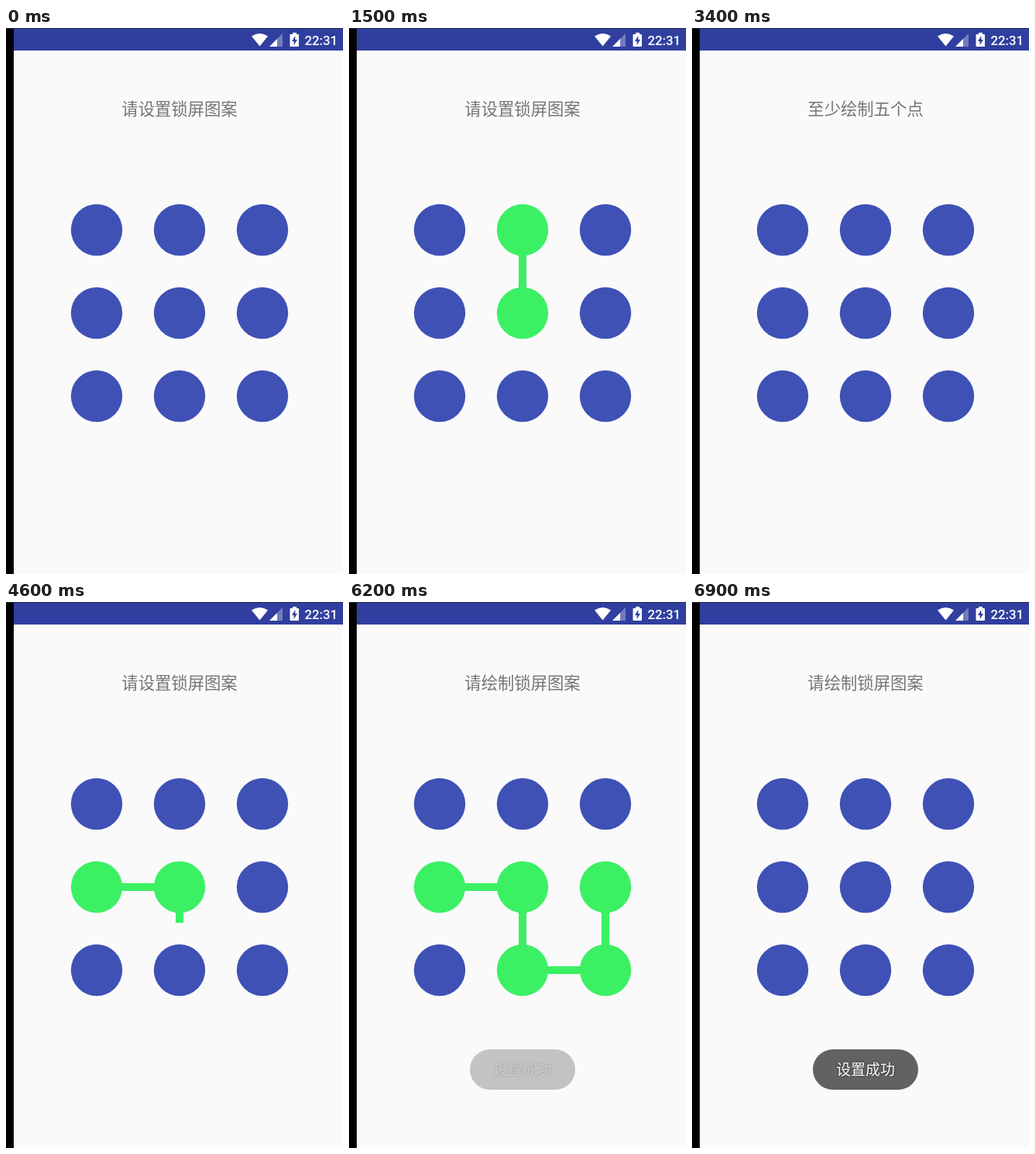
Recreate the animation shown at these times as an HTML page with a canvas. Size 435x703 px, loop 8000 ms.

```html
<!DOCTYPE html>
<html lang="zh-CN">
<head>
<meta charset="utf-8">
<title>锁屏图案</title>
<style>
  html, body { margin: 0; width: 100%; height: 100%; overflow: hidden; background: #fafafa; }
  canvas { display: block; width: 435px; height: 703px; }
</style>
</head>
<body>
<canvas id="stage" width="435" height="703"></canvas>
<script>
const ctx = document.getElementById('stage').getContext('2d');
const LOOP = 8000, STEP = 100;
const BLUE = '#3f51b5', GREEN = '#3cf064', PINK = '#ff4081', BAR = '#303f9f';
const CJK = '"Noto Sans CJK SC", "Noto Sans CJK", sans-serif';
const SET = '请设置锁屏图案', FEW = '至少绘制五个点', DRAW = '请绘制锁屏图案';

// Dots are numbered 0-8 in rows; tip is the loose end under the finger.
const states = [
  { t: 0, title: SET, path: [] },
  { t: 1100, title: SET, path: [1] },
  { t: 1400, title: SET, path: [1], tip: [224, 314] },
  { t: 1500, title: SET, path: [1, 4] },
  { t: 1800, title: SET, path: [1, 4], tip: [222, 408] },
  { t: 1900, title: SET, path: [1, 4], tip: [219, 418] },
  { t: 2100, title: SET, path: [1, 4], tip: [221, 432] },
  { t: 2200, title: SET, path: [1, 4, 7] },
  { t: 2500, title: FEW, path: [1, 4, 7], color: PINK },
  { t: 3400, title: FEW, path: [] },
  { t: 4200, title: SET, path: [3] },
  { t: 4300, title: SET, path: [3, 4] },
  { t: 4600, title: SET, path: [3, 4], tip: [224, 413] },
  { t: 4700, title: SET, path: [3, 4, 7] },
  { t: 5000, title: SET, path: [3, 4, 7], tip: [284, 474] },
  { t: 5100, title: SET, path: [3, 4, 7, 8] },
  { t: 5600, title: SET, path: [3, 4, 7, 8, 5] },
  { t: 6000, title: DRAW, path: [3, 4, 7, 8, 5] },
  { t: 6900, title: DRAW, path: [] }
];

const dotAt = i => [117 + 107 * (i % 3), 260 + 107 * Math.floor(i / 3)];

function rect(x, y, w, h, color) {
  ctx.fillStyle = color;
  ctx.fillRect(x, y, w, h);
}

function poly(points, color) {
  ctx.beginPath();
  points.forEach(p => ctx.lineTo(...p));
  ctx.closePath();
  ctx.fillStyle = color;
  ctx.fill();
}

function label(text, x, y, font, color, align) {
  ctx.font = font;
  ctx.fillStyle = color;
  ctx.textAlign = align;
  ctx.fillText(text, x, y);
}

function drawStatusBar() {
  rect(10, 0, 425, 29, BAR);
  rect(0, 0, 10, 703, '#000');
  rect(0, 0, 435, 1, '#272c4c');

  // Wi-Fi fan
  ctx.beginPath();
  ctx.moveTo(327.5, 23.5);
  ctx.lineTo(317, 10.5);
  ctx.quadraticCurveTo(327.5, 3.5, 338, 10.5);
  ctx.closePath();
  ctx.fillStyle = '#fff';
  ctx.fill();

  // Signal
  poly([[340, 24], [357, 24], [357, 7]], 'rgba(255,255,255,.32)');
  poly([[340, 24], [350, 24], [350, 14]], '#fff');

  // Battery with bolt
  rect(370, 6, 5, 3, '#fff');
  ctx.beginPath();
  ctx.roundRect(366.5, 8, 11.5, 16, 1);
  ctx.fillStyle = '#fff';
  ctx.fill();
  poly([[373.3, 10], [369, 17], [371.6, 17], [371.6, 22], [376, 15], [373.3, 15]], BAR);

  label('22:31', 428, 22, '500 16.8px Roboto, sans-serif', '#fff', 'right');
}

function drawPattern({ path, tip, color = GREEN }) {
  const line = path.map(dotAt);
  if (tip) line.push(tip);
  ctx.beginPath();
  line.forEach(p => ctx.lineTo(...p));
  ctx.strokeStyle = color;
  ctx.lineWidth = 10;
  ctx.stroke();

  for (let i = 0; i < 9; i++) {
    ctx.beginPath();
    ctx.arc(...dotAt(i), 33.2, 0, Math.PI * 2);
    ctx.fillStyle = path.includes(i) ? color : BLUE;
    ctx.fill();
  }
}

function drawToast(time) {
  if (time < 6200) return;
  const x = Math.min(1, (time - 6100) / 500);
  ctx.save();
  ctx.globalAlpha = 1 - (1 - x) ** 2;
  ctx.beginPath();
  ctx.roundRect(156, 576, 136, 52, 26);
  ctx.fillStyle = '#626262';
  ctx.fill();
  ctx.shadowColor = 'rgba(0,0,0,.6)';
  ctx.shadowBlur = 3;
  label('设置成功', 224, 609, `18.9px ${CJK}`, '#fff', 'center');
  ctx.restore();
}

function frame(now) {
  const time = Math.floor((now % LOOP) / STEP) * STEP;
  const state = states.findLast(s => s.t <= time);
  rect(0, 0, 435, 703, '#fafafa');
  drawStatusBar();
  label(state.title, 224, 112, `21.35px ${CJK}`, '#757575', 'center');
  drawPattern(state);
  drawToast(time);
}

let start;
function tick(now) {
  start ??= now;
  frame(Math.max(0, now - start));
  requestAnimationFrame(tick);
}
frame(0);
requestAnimationFrame(tick);
</script>
</body>
</html>
```
